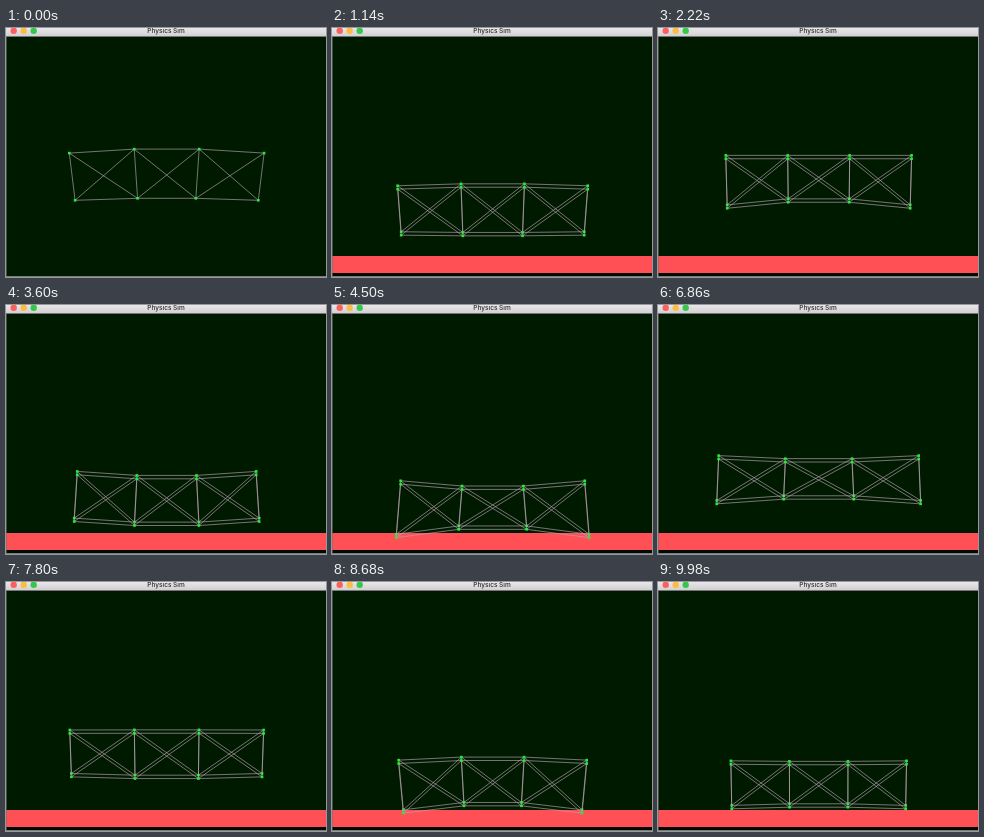
An HTML page with a canvas for the animation above (10 s loop, 320x249 px).

```html
<!DOCTYPE html>
<html>
<head>
<meta charset="utf-8">
<style>
html, body { margin: 0; width: 100%; height: 100%; overflow: hidden; background: #001a00; }
canvas { display: block; }
</style>
</head>
<body>
<canvas id="stage" width="320" height="249"></canvas>
<script>
const ctx = document.getElementById('stage').getContext('2d');
const LOOP = 10000, STEP = 20;
const CENTER = 160.7, CONTACT_Y = 226.8, GRAVITY = 200;
const BACKGROUND = '#001a00';

// Times (s) at which the truss bounces off the floor.
const hits = [-0.555, 1, 2.64, 3.704, 4.5, 5.221, 6.3, 7.431, 8.688, 9.4, 10.023];

// Time (s), half width, height and sag of the top chord.
const keys = [
  [0, 94.5, 48.2, 4], [2.22, 92.2, 46.5, 0], [3.6, 91, 46.7, -4], [5.42, 97.6, 46.7, -6.5],
  [6.86, 101, 41, -3], [8.68, 91.7, 47.5, 3], [9.98, 87.4, 43.5, -0.5]
];

// Nodes 0-3 run along the top, 4-7 along the bottom.
const beams = [0, 1, 2, 3].map(i => [i, i + 4]);
for (let i = 0; i < 3; i++)
  beams.push([i, i + 1], [i + 4, i + 5], [i, i + 5], [i + 1, i + 4]);

function bounceHeight(t) {
  const i = hits.findIndex(hit => hit > t);
  return GRAVITY / 2 * (t - hits[i - 1]) * (hits[i] - t);
}

function shapeAt(t) {
  const next = keys.findIndex(key => key[0] > t);
  if (next < 0) return keys[keys.length - 1];
  const a = keys[next - 1], b = keys[next];
  const p = (t - a[0]) / (b[0] - a[0]);
  return a.map((v, i) => v + (b[i] - v) * p * p * (3 - 2 * p));
}

function chord(outer, inner, y, sag) {
  return [-outer, -inner, inner, outer].map((x, i) =>
    [CENTER + x, y + (i % 3 ? -sag : sag) / 2]);
}

function trussAt(t) {
  const [, width, height, sag] = shapeAt(t);
  const footSag = 2 + 6.3 * Math.sin(Math.PI * t);
  const taper = 0.55 * sag + 0.7;
  const top = width + taper, bottom = width - taper;
  const y = CONTACT_Y - bounceHeight(t);
  return [
    ...chord(top, top / 3, y - height, sag),
    ...chord(bottom, bottom / 3 - 0.35 * sag, y, footSag)
  ];
}

function rect(color, x, y, w, h) {
  ctx.fillStyle = color;
  ctx.fillRect(x, y, w, h);
}

function drawTruss(nodes, dy) {
  ctx.strokeStyle = '#b8a4b4';
  ctx.lineWidth = 0.65;
  ctx.beginPath();
  for (const [a, b] of beams) {
    ctx.moveTo(nodes[a][0], nodes[a][1] + dy);
    ctx.lineTo(nodes[b][0], nodes[b][1] + dy);
  }
  ctx.stroke();
  for (const [x, y] of nodes) rect('#2be83c', x - 1.3, y + dy - 1.3, 2.6, 2.6);
}

function drawWindow() {
  const bar = ctx.createLinearGradient(0, 0, 0, 8);
  bar.addColorStop(0, '#e9e7e9');
  bar.addColorStop(1, '#d2d0d2');
  rect(bar, 0, 0, 320, 8);
  rect('#777577', 0, 8, 320, 1);
  ['#fc605c', '#fdbc40', '#34c84a'].forEach((color, i) => {
    ctx.fillStyle = color;
    ctx.beginPath();
    ctx.arc(7.7 + i * 10, 2.8, 3.2, 0, 7);
    ctx.fill();
  });
  ctx.fillStyle = '#2a2a2a';
  ctx.font = '500 6.5px Inter, Roboto, sans-serif';
  ctx.textAlign = 'center';
  ctx.fillText('Physics Sim', 160, 5.3);
  rect('#6d756d', 0, 9, 0.6, 240);
  rect('#777d77', 0, 248, 320, 1);
}

const start = performance.now();

function frame() {
  const ms = Math.floor((performance.now() - start) % LOOP / STEP) * STEP;
  const started = ms >= STEP;
  const nodes = trussAt(ms / 1000);
  rect(BACKGROUND, 0, 0, 320, 249);
  if (started) {
    rect('#ff5055', 0, 228, 320, 17);
    rect('#000a00', 0, 245, 320, 3);
  }
  // Once running, each picture shows the truss twice, slightly apart.
  for (const dy of started ? [-1.7, 1.7] : [0]) drawTruss(nodes, dy);
  drawWindow();
  requestAnimationFrame(frame);
}
frame();
</script>
</body>
</html>
```
